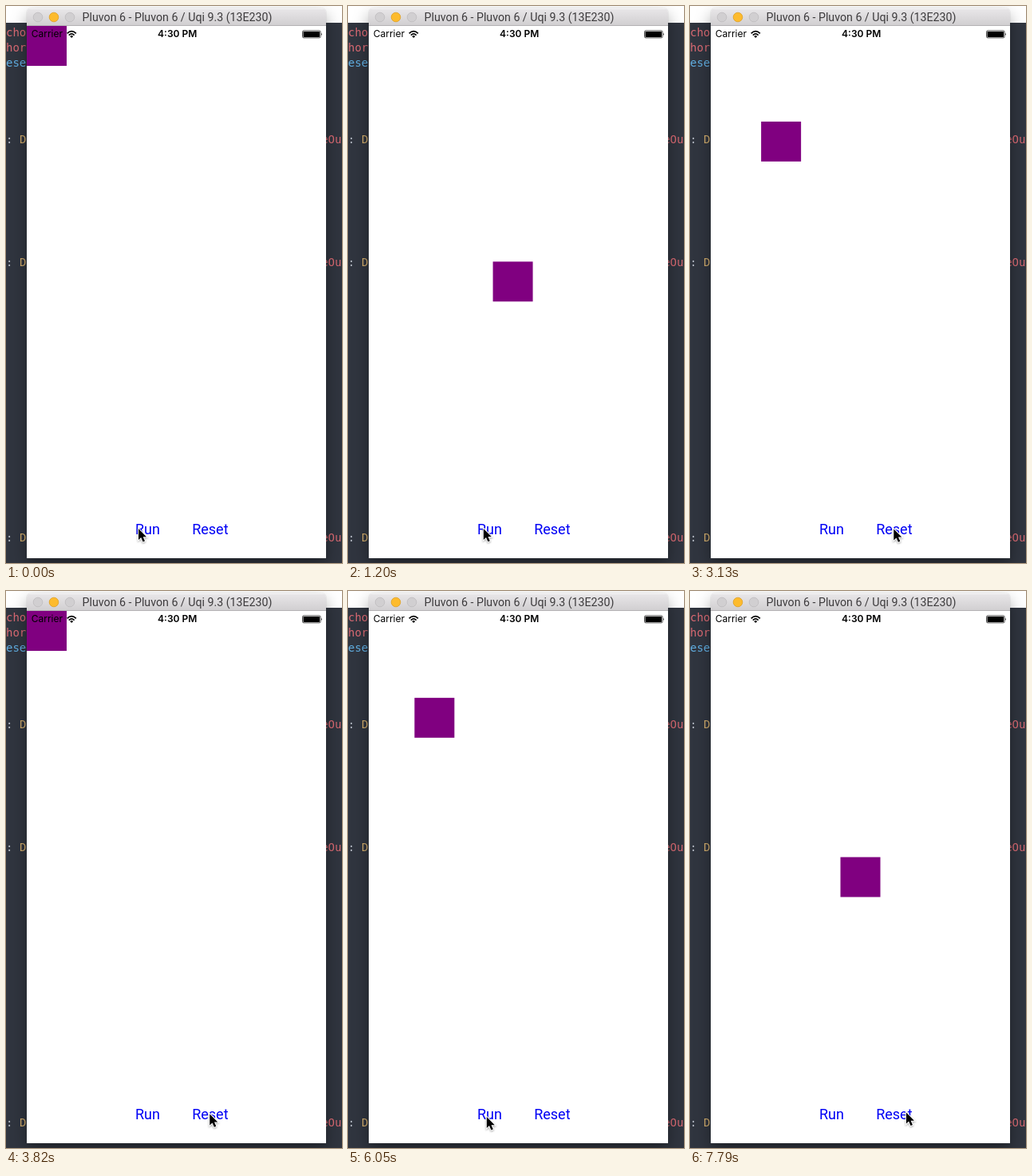
These frames come from a looping animation (421x698 px, 8000 ms). An HTML page:

```html
<!DOCTYPE html>
<html lang="en">
<head>
<meta charset="utf-8">
<title>Bounce easing demo</title>
<style>
  html, body { margin: 0; width: 100%; height: 100%; overflow: hidden; background: #fff; }
  #stage { position: absolute; left: 0; top: 0; width: 421px; height: 698px; overflow: hidden; }
  #editor { position: absolute; left: 0; top: 21px; width: 421px; height: 677px; background: #30353f; }
  #window {
    position: absolute; left: 26px; top: 3px; width: 375px; height: 689px;
    border-radius: 5px 5px 0 0; background: #fff; overflow: hidden;
  }
  #shade {
    position: absolute; left: 26px; top: 3px; width: 375px; height: 689px;
    border-radius: 5px 5px 0 0;
    box-shadow: 0 9px 20px rgba(0, 0, 0, .36), 0 0 1px rgba(0, 0, 0, .35);
  }
  #bar {
    height: 21px; border-bottom: 1px solid #b4b2b4;
    background: linear-gradient(#e9e7e9, #d1cfd1); box-shadow: inset 0 1px #f4f3f4;
  }
  svg { position: absolute; left: 0; top: 0; }
  .code { font: 14px "DejaVu Sans Mono", monospace; white-space: pre; }
  .title { font: 14.2px Roboto, sans-serif; fill: #3d3b3d; }
  .status { font: 12px Inter, sans-serif; }
  .button { font: 18px Roboto, sans-serif; fill: #0000f5; }
</style>
</head>
<body>
<div id="stage">
  <div id="editor"></div>
  <svg id="code" class="code" width="421" height="698"></svg>
  <div id="shade"></div>
  <div id="window"><div id="bar"></div></div>
  <svg width="421" height="698" viewBox="0 0 421 698">
    <g stroke="#bebcbe" stroke-width=".8" fill="#d1cfd1">
      <circle cx="40" cy="14" r="5.8"/>
      <circle cx="60" cy="14" r="5.8" fill="#fdbb2d" stroke="#dfa023"/>
      <circle cx="80" cy="14" r="5.8"/>
    </g>
    <text class="title" x="214.5" y="19" text-anchor="middle">Pluvon 6 - Pluvon 6 / Uqi 9.3 (13E230)</text>

    <rect id="box" width="50" height="50" fill="#800080"/>

    <g class="status">
      <text x="31.7" y="39.4">Carrier</text>
      <text x="214.7" y="39.4" text-anchor="middle" font-weight="600">4:30 PM</text>
    </g>
    <g fill="none" stroke="#000" stroke-width="1.7">
      <path d="M76.6 34.3 Q82.2 29 87.8 34.3"/>
      <path d="M78.8 36.6 Q82.2 33.3 85.6 36.6"/>
    </g>
    <path d="M80.2 37.9 Q82.2 36.2 84.2 37.9 L82.2 40Z"/>
    <rect x="371.5" y="30.9" width="22.6" height="9" rx="1.6" fill="none" stroke="#000" stroke-width=".7"/>
    <rect x="372.5" y="31.9" width="20.6" height="7" rx=".6"/>
    <path d="M395 33.7 Q396.6 35.4 395 37.1Z"/>

    <text class="button" x="162" y="662">Run</text>
    <text class="button" x="233.2" y="662">Reset</text>

    <g id="cursor" style="filter: drop-shadow(0 1px 1px rgba(0,0,0,.35))">
      <path d="M0 0V14L3.2 11L5.6 16.4L8 15.4L5.7 10.2H10Z" stroke="#fff" stroke-width="2" paint-order="stroke"/>
    </g>
  </svg>
</div>
<script>
const LOOP = 8000;
const HOME = [26, 25], CENTER = [188.5, 333.5];
const $ = id => document.getElementById(id);

// Editor text: line number, x, colour, content
const RED = '#da6a73', BLUE = '#61afe3', GOLD = '#cfab6c', GRAY = '#b4bac4';
const lines = [[0, 0, RED, 'cho'], [1, 0, RED, 'hor'], [2, 0, BLUE, 'ese']];
for (const n of [7, 15, 33])
  lines.push([n, 0, GRAY, ':'], [n, 16.9, GOLD, 'De'], [n, 395.2, RED, 'eOut']);
$('code').innerHTML = lines.map(([n, x, fill, s]) =>
  `<text x="${x}" y="${37.8 + n * 19.2}" fill="${fill}">${s}</text>`).join('');

// Screen updates are spans of evenly spaced steps: [first, last, count]
const runs = [
  { start: 433, dur: 1000, to: CENTER, spans: [[490, 1260, 14], [1310, 1430, 3]] },
  { start: 2859, dur: 953, to: HOME, spans: [[2910, 3700, 15], [3760, 3820, 2]] },
  { start: 5834, dur: 1000, to: CENTER, spans: [[5890, 6680, 15], [6740, 6860, 3]] },
];

// Cursor moves; bow lifts the middle of the path
const moves = [
  { span: [60, 260, 4], to: [169.8, 654.9], bow: 0 },
  { span: [2090, 2370, 6], to: [255.6, 654.6], bow: 1.5 },
  { span: [2910, 2910, 1], to: [255.3, 655.4], bow: 0 },
  { span: [4240, 4870, 12], to: [173.8, 659], bow: 0 },
  { span: [7270, 7500, 5], to: [287.3, 647.8], bow: 0 },
  { span: [7680, 7790, 3], to: [270.9, 653.6], bow: 0 },
];

const mix = (a, b, p) => a.map((v, i) => v + (b[i] - v) * p);
const smooth = p => p * p * (3 - 2 * p);

function stepTimes([first, last, n]) {
  const gap = n > 1 ? (last - first) / (n - 1) : 0;
  return Array.from({ length: n }, (_, k) => Math.floor((first + k * gap) / 10) * 10);
}

for (const r of runs) r.times = r.spans.flatMap(stepTimes);
for (const m of moves) m.times = stepTimes(m.span);

const stepsDone = (times, t) => times.filter(s => s <= t).length;

function bounceOut(x) {
  const k = 7.5625, d = 2.75;
  if (x < 1 / d) return k * x * x;
  if (x < 2 / d) return k * (x - 1.5 / d) ** 2 + .75;
  if (x < 2.5 / d) return k * (x - 2.25 / d) ** 2 + .9375;
  return k * (x - 2.625 / d) ** 2 + .984375;
}

function boxAt(t) {
  let pos = HOME;
  for (const { start, dur, to, times } of runs) {
    const n = stepsDone(times, t);
    if (!n) break;
    pos = n === times.length ? to : mix(pos, to, bounceOut((times[n - 1] - start) / dur));
  }
  return pos;
}

function cursorAt(t) {
  let pos = [166, 655];
  for (const { to, bow, times } of moves) {
    const n = stepsDone(times, t);
    if (!n) break;
    const p = n / times.length;
    pos = mix(pos, to, smooth(p));
    pos[1] -= bow * Math.sin(Math.PI * p);
  }
  return pos;
}

const place = (el, pos) => el.setAttribute('transform', `translate(${pos})`);
const begin = performance.now();

function draw() {
  const t = Math.max(0, performance.now() - begin) % LOOP;
  place($('box'), boxAt(t));
  place($('cursor'), cursorAt(t));
  requestAnimationFrame(draw);
}
draw();
</script>
</body>
</html>
```
